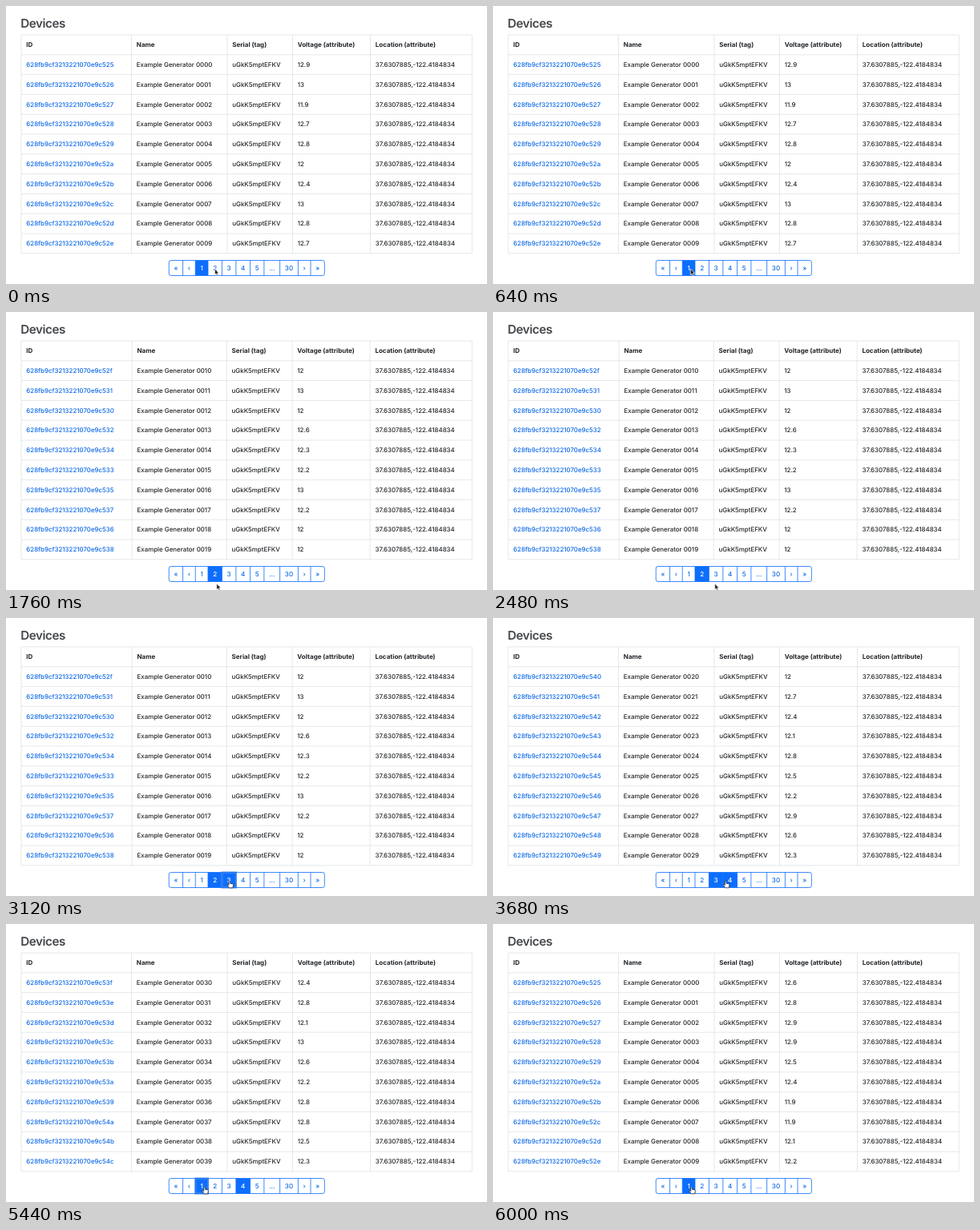
Recreate the animation shown at these times as an HTML page. Size 600 by 347 pixels, loop 6.08 s.

```html
<!DOCTYPE html>
<html lang="en">
<head>
<meta charset="utf-8">
<title>Devices</title>
<style>
html, body { margin: 0; width: 100%; height: 100%; overflow: hidden; background: #fff; }
svg { display: block; width: 600px; height: 347px; }
text { font: 500 7.9px Inter, "Open Sans", sans-serif; fill: #212529; text-rendering: geometricPrecision; }
.title { font-size: 15.2px; font-weight: 600; letter-spacing: -.03em; fill: #43464a; }
.head { font-size: 8px; font-weight: 700; }
.link { fill: #0d69e8; }
.label { font-size: 8.1px; fill: #0d69e8; text-anchor: middle; }
.on .label { fill: #fff; }
.cell { fill: none; }
.on .cell { fill: #0d6efd; }
.focus .cell { stroke: #5c94e8; stroke-width: 2; }
.line { fill: none; stroke-width: .8; }
</style>
</head>
<body>
<svg viewBox="0 0 600 347">
  <text class="title" x="18.3" y="27.2">Devices</text>
  <g id="table"></g>
  <g id="pager"></g>
  <g id="cursor" stroke-width=".7" stroke-linejoin="round">
    <path id="arrow" fill="#222" stroke="#fff" d="M0 0V7.6L1.7 6.1 2.9 8.8 4.2 8.2 3.1 5.6H5.4Z"/>
    <path id="hand" fill="#fff" stroke="#222" d="M-.8 .7Q0 -.5 .8 .7V3.2L4 3.9Q4.9 4.2 4.7 5.4L4 8.8H-.3L-2.7 5.6Q-2.8 4.4 -1.7 4.8L-.8 5.5Z"/>
  </g>
</svg>
<script>
const LOOP = 6080, STEP = 80, CLICK = 120, LOAD = 320;
const LEFT = 19, RIGHT = 581.3, TOP = 36, ROW = 24.8;
const $ = id => document.getElementById(id);
const text = (x, y, str, cls = "") => `<text class="${cls}" x="${x}" y="${y}">${str}</text>`;

const heads = ["ID", "Name", "Serial (tag)", "Voltage (attribute)", "Location (attribute)"];
const count = r => 0x525 + r;
const randomVolts = Array.from({ length: 10 }, (_, r) => 12 + r * 7 % 10 / 10).join(" ");

// num: page number, id: last id digits by row, shift: column drift from auto layout
const pages = [
  { num: 1, id: count, volts: "12.9 13 11.9 12.7 12.8 12 12.4 13 12.8 12.7" },
  { num: 2, id: r => 0x52f + r + [0, 1, -1][r % 3], volts: "12 13 12 12.6 12.3 12.2 13 12.2 12 12", shift: .7 },
  { num: 3, id: r => 0x540 + r, volts: randomVolts },
  { num: 4, id: r => r < 7 ? 0x53f - r : 0x543 + r, volts: "12.4 12.8 12.1 13 12.6 12.2 12.8 12.8 12.5 12.3" },
  { num: 1, id: count, volts: "12.6 12.8 12.9 12.9 12.5 12.4 11.9 11.9 12.1 12.2" }
];

// Pointer moves; one with a page ends in a click that loads it
const moves = [
  { start: -1, end: 0, x: 260.4, dip: 0 },
  { start: 160, end: 600, x: 246.3, dip: 11 },
  { start: 720, end: 1040, x: 260.6, dip: 11, page: 1 },
  { start: 1360, end: 2880, x: 278.8, dip: 11, page: 2 },
  { start: 3440, end: 3840, x: 295.5, dip: 0, page: 3 },
  { start: 4400, end: 5280, x: 247.6, dip: 12, page: 4 }
];

function table({ num, id, volts, shift = 0 }) {
  const cols = [LEFT, 156.5 + shift, 276 - shift, 357.4 - shift / 2, 454.5 - shift / 2, RIGHT];
  const cells = (row, y, cls) => row.map((s, c) => text(cols[c] + 6.3, y, s, cls(c))).join("");
  let lines = cols.map(x => `M${x} ${TOP}V${TOP + ROW * 11}`).join("");
  for (let r = 0; r < 12; r++) lines += `M${LEFT} ${TOP + ROW * r}H${RIGHT}`;
  let body = cells(heads, 51, () => "head");
  volts.split(" ").forEach((v, r) => {
    const name = "Example Generator " + String(num * 10 - 10 + r).padStart(4, "0");
    const row = ["628fb9cf3213221070e9c" + id(r).toString(16), name, "uGkK5mptEFKV", v, "37.6307885,-122.4184834"];
    body += cells(row, 75.9 + ROW * r, c => c ? "" : "link");
  });
  return `<path class="line" stroke="#dee2e6" d="${lines}"/>` + body;
}

// Buttons as wide as their labels plus padding, centred as a group
const labels = ["«", "‹", 1, 2, 3, 4, 5, "...", 30, "›", "»"];
$("pager").innerHTML = labels.map(s => text(0, 0, s, "label")).join("");
const widths = [...$("pager").children].map(e => e.getComputedTextLength() + 12.4);
const total = widths.reduce((a, b) => a + b);
let edge = 300.3 - total / 2, dividers = "";
const frame = `<rect class="line" stroke="#0d6efd" x="${edge}" y="317.5" width="${total}" height="19" rx="2.5"/>`;
const rights = [];
$("pager").innerHTML = labels.map((s, i) => {
  const x = edge, w = widths[i];
  rights.push(edge += w);
  if (i) dividers += `M${x} 317.5v19`;
  return `<g class="button"><rect class="cell" x="${x}" y="317.5" width="${w}" height="19"/>
    ${text(x + w / 2, 329.9, s, "label")}</g>`;
}).join("") + `<path class="line" stroke="#0d6efd" d="${dividers}"/>` + frame;
const buttons = [...document.querySelectorAll(".button")];
const buttonAt = x => labels[rights.findIndex(e => e > x)];

let shown;
function draw(now) {
  const t = Math.floor(now % LOOP / STEP) * STEP;
  const i = moves.findLastIndex(m => m.start <= t), move = moves[i];
  const u = Math.min(1, (t - move.start) / (move.end - move.start));
  const ease = u * u * u * (10 - 15 * u + 6 * u * u);
  const from = i ? moves[i - 1].x : move.x;
  const x = from + (move.x - from) * ease;
  const y = 328 + move.dip * Math.min(1, 5.2 * u * (1 - u));

  const page = pages[moves.findLast(m => m.page && m.end + LOAD <= t)?.page ?? 0];
  if (page !== shown) $("table").innerHTML = table(shown = page);

  const since = t - move.end;
  const focus = move.page && since >= CLICK && since < LOAD && buttonAt(move.x);
  const over = move.page && y < 336 && buttonAt(x);
  buttons.forEach((b, k) => {
    b.classList.toggle("on", [page.num, focus, over].includes(labels[k]));
    b.classList.toggle("focus", labels[k] === focus);
  });
  $("cursor").setAttribute("transform", `translate(${x} ${y})`);
  $("hand").style.display = over ? "" : "none";
  $("arrow").style.display = over ? "none" : "";
}

const start = performance.now();
function tick() {
  draw(performance.now() - start);
  requestAnimationFrame(tick);
}
tick();
</script>
</body>
</html>
```
